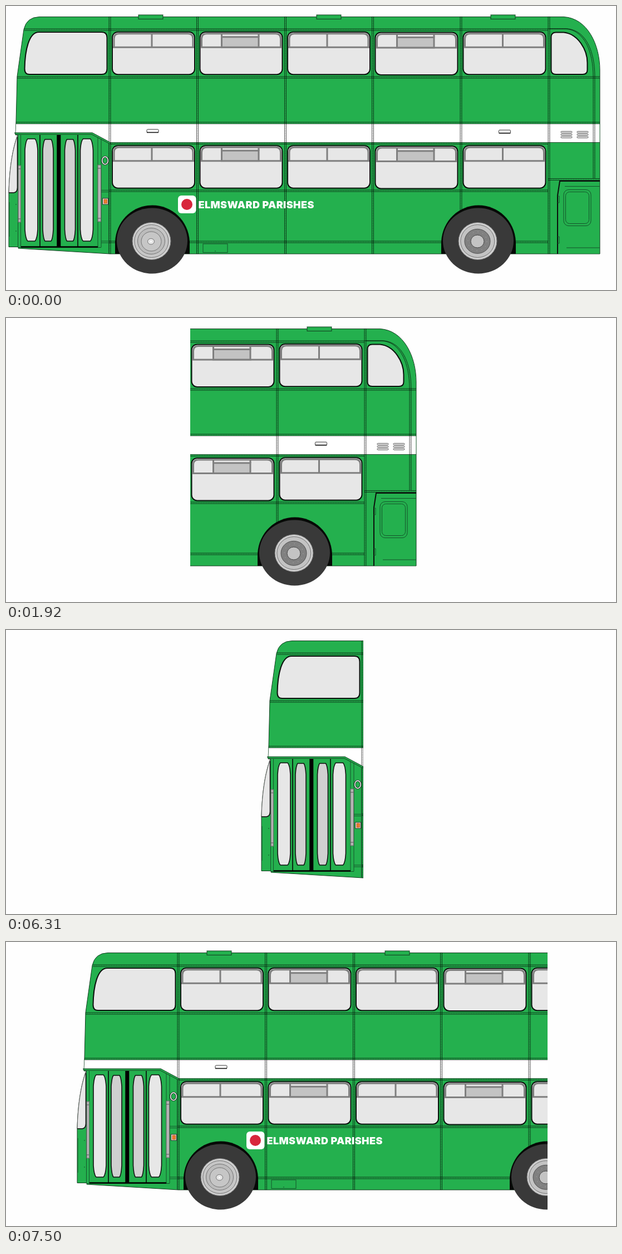
Write an HTML page that moves like this. It is 1096x511 px and loops after 8 s.

```html
<!DOCTYPE html>
<html lang="en">
<head>
<meta charset="utf-8">
<title>Green double-decker</title>
<style>
  html, body { margin: 0; width: 100%; height: 100%; overflow: hidden; background: #fefefe; }
  svg { display: block; width: 1096px; height: 511px; animation: drive 8s step-end infinite; }
  text { font: 900 18px Inter, "Open Sans", sans-serif; letter-spacing: .4px; fill: #fff; }

  .green { fill: #24b04e; }
  .glass { fill: #e7e7e7; }
  .shade { fill: #d0d0d0; }
  .edge { stroke: #123c1f; stroke-width: 1; }
  .rim { stroke: #0b0f0c; stroke-width: 2; }
  .line { fill: none; stroke: #14532a; stroke-width: 1; }
  .seam { fill: none; stroke: #000; stroke-opacity: .62; stroke-width: 1; }
  .stitch { fill: none; stroke: #000; stroke-opacity: .28; stroke-width: 2; stroke-dasharray: 1 2; }
  .bar { fill: none; stroke: #7f7f7f; stroke-width: 3; }
  .rail { fill: #b4b4b4; stroke: #6b6b6b; stroke-width: 1; }
  .ring { stroke: #737373; stroke-width: 1; }

  /* The bus leaves to the left behind one edge and returns from behind the other. */
  @keyframes drive {
    0%      { transform: translateX(0);      clip-path: inset(0 0 0 0); }
    11.875% { transform: translateX(-89px);  clip-path: inset(0 0 0 179px); }
    18.125% { transform: translateX(-185px); clip-path: inset(0 0 0 370px); }
    24%     { transform: translateX(-330px); clip-path: inset(0 0 0 661px); }
    29.375% { transform: translateX(-462px); clip-path: inset(0 0 0 924px); }
    33.875% { transform: translateX(0);      clip-path: inset(0 0 0 1096px); }
    78.875% { transform: translateX(454px);  clip-path: inset(0 908px 0 0); }
    83.25%  { transform: translateX(297px);  clip-path: inset(0 596px 0 0); }
    88.5%   { transform: translateX(217px);  clip-path: inset(0 435px 0 0); }
    93.75%  { transform: translateX(123px);  clip-path: inset(0 246px 0 0); }
  }
</style>
</head>
<body>
<svg viewBox="0 0 1096 511">
  <defs>
    <g id="pane">
      <rect class="glass rim" width="148" height="76.5" rx="10"/>
      <path class="bar" d="M3 26V12Q3 3 12 3H136Q145 3 145 12V26M1 27.5H147"/>
    </g>
    <g id="split">
      <use href="#pane"/>
      <path class="bar" d="M71 3V27"/>
    </g>
    <g id="hopper">
      <use href="#pane"/>
      <rect class="bar" x="39" y="9" width="66.5" height="18.5" style="fill:#c3c3c3"/>
      <path class="bar" d="M39 3V9M105.5 3V9"/>
    </g>
    <g id="deck">
      <use href="#split" x="191"/>
      <use href="#hopper" x="348.5"/>
      <use href="#split" x="506"/>
      <use href="#hopper" x="663.5" y=".7"/>
      <use href="#split" x="821.5"/>
    </g>

    <path id="uprights" d="M185 19V446M342.5 19V446M500.5 19V446M657.5 19V446M816 19V446M974 19V446"/>
    <path id="levels" d="M33 41H974M20 127H1067M18 209H1067M188 245.5H974M171 331H974M171 423H974M974 310.5H1067"/>
    <path id="tail" d="M974 41H1006C1040 44 1055 84 1055 127V310"/>

    <rect id="vent" class="green edge" y="16" width="44" height="7.5"/>
    <g id="handle">
      <rect width="21" height="5.5" rx="1.5" fill="#fff" stroke="#333"/>
      <path d="M0 5.5H21" stroke="#111" stroke-width="1.6"/>
    </g>
    <g id="louvre" fill="#fff" stroke="#444" stroke-width=".9">
      <rect width="20" height="2.6" rx="1.3"/>
      <rect y="4.6" width="20" height="2.6" rx="1.3"/>
      <rect y="9.2" width="20" height="2.6" rx="1.3"/>
    </g>
    <path id="wide" d="M5 239H18Q22 243 23 260V402Q22 419 18 423H5Q1 419 0 402V260Q1 243 5 239Z" stroke="#111" stroke-width="1.6"/>
    <path id="slim" d="M4 240H15Q18 244 19 260V402Q18 419 15 423H4Q1 419 0 402V260Q1 244 4 240Z" stroke="#111" stroke-width="1.6"/>
    <g id="tyre">
      <path d="M-67 446V424C-65 386-35 358.500 0 358.500S65 386 67 424V446Z" fill="#060806"/>
      <ellipse cx="-.5" cy="422.500" rx="63.500" ry="59" fill="#393939"/>
      <ellipse class="ring" cx="-1.500" cy="423" rx="34.500" ry="33.500" fill="#cfcfcf"/>
    </g>
  </defs>

  <!-- Body shell -->
  <path class="green edge" d="M60 19.500H1002C1045 22 1067 70 1067 115V446H187L22 436V433.500H5V336C6 292 12 256 21 232H17L18 209 20 127 32 42Q37 20 60 19.500Z"/>
  <path d="M18 212H1066.500V245.500H187L155 229H17.500Z" fill="#fff"/>

  <!-- Panel seams -->
  <g class="seam">
    <use href="#uprights"/><use href="#uprights" x="3"/>
    <use href="#levels"/><use href="#levels" y="3"/>
    <use href="#tail"/><use href="#tail" x="3"/>
    <path d="M974 245.500H1067"/>
  </g>
  <g class="stitch">
    <use href="#uprights" x="1.500"/>
    <use href="#levels" y="1.500"/>
    <use href="#tail" x="1.500"/>
  </g>

  <use href="#vent" x="238"/>
  <use href="#vent" x="558"/>
  <use href="#vent" x="871"/>

  <!-- Windows -->
  <path class="glass rim" d="M59 47H172Q181.500 47 181.500 57V113Q181.500 123 172 123H42Q33.500 123 33.500 113C34 80 41 47 59 47Z"/>
  <use href="#deck" y="46.700"/>
  <use href="#deck" y="251.200"/>
  <path class="glass rim" d="M988 47.500H1002C1028 50 1044.500 79 1044.500 102V115Q1044.500 123 1036 123H988Q979.500 123 979.500 115V56Q979.500 47.500 988 47.500Z"/>

  <use href="#handle" x="253" y="222"/>
  <use href="#handle" x="885.500" y="223.200"/>
  <use href="#louvre" x="997" y="225.500"/>
  <use href="#louvre" x="1026" y="225.500"/>

  <!-- Cab and entrance -->
  <path class="glass" d="M21 232C12 256 6 292 5 336H14Q20.500 335 20.500 327Z" stroke="#555"/>
  <path d="M5 336H14Q20.500 335 20.500 327V236" fill="none" stroke="#111" stroke-width="1.600"/>
  <path class="green" d="M22 231H155L184 247V434H22Z"/>
  <path class="line" d="M21.500 232V434M26.500 232V434M165 236V434M171 240V434M184.500 247V446M171 331.500H187M171 334.500H187M171 423H187M171 426H187M22 434.500H171"/>
  <path class="line" d="M6 353V415M18 356V358M18 404V406"/>
  <path class="green edge" d="M15.500 228H155L187.500 245.500V248.500L154 231H17Z"/>
  <path d="M61 232V433M129 232V433" stroke="#0b1a10" stroke-width="1.800"/>
  <path d="M94.800 232V433" stroke="#000" stroke-width="7"/>
  <path d="M27 433.500H165" stroke="#000" stroke-width="2.600"/>
  <use href="#wide" class="glass" x="34"/>
  <use href="#slim" class="shade" x="66"/>
  <use href="#slim" class="shade" x="105.500"/>
  <use href="#wide" class="glass" x="133.500"/>
  <rect class="rail" x="22" y="287" width="4.500" height="102"/>
  <rect class="rail" x="165" y="286" width="5.500" height="102"/>
  <path d="M22 293H26M22 383H26M165 292H170M165 382H170" stroke="#555"/>
  <ellipse cx="178" cy="278" rx="5.300" ry="6.800" fill="none" stroke="#111" stroke-width="3.200"/>
  <ellipse cx="178" cy="278" rx="5.300" ry="6.800" fill="none" stroke="#eee" stroke-width="1.700"/>
  <rect x="173.500" y="346" width="10" height="11" fill="#e9ddd5" stroke="#333"/>
  <rect x="176" y="348" width="5.500" height="7" fill="#ee7a2e" stroke="#b3541c" stroke-width=".8"/>

  <!-- Engine cover -->
  <path class="green" d="M995 315H1066V445.500H991V340Z"/>
  <path class="rim" d="M1067 315H995L991 341V446" fill="none"/>
  <path class="line" d="M1004 324.500H1067M1007 435H1067M991 342H994V354H991M991 415H994V427H991"/>
  <rect class="line" x="1002" y="330.500" width="49" height="65" rx="9"/>
  <rect class="line" x="1005.500" y="334.500" width="42" height="57" rx="7"/>

  <rect class="line" x="354" y="428" width="44" height="15.500"/>
  <path class="line" d="M376 440V442"/>

  <!-- Fleet name -->
  <rect x="309" y="341" width="32.500" height="32" rx="6" fill="#fff"/>
  <circle cx="325" cy="357" r="10" fill="#d8263c"/>
  <text x="345.500" y="364">ELMSWARD PARISHES</text>

  <!-- Wheels -->
  <use href="#tyre" x="263"/>
  <g class="ring" fill="#c6c6c6">
    <ellipse cx="261.300" cy="423" rx="30.500" ry="29.500"/>
    <ellipse cx="261" cy="423" rx="24.500" ry="23.500" fill="#bcbcbc"/>
    <ellipse cx="261" cy="423.500" rx="18" ry="17.500"/>
    <ellipse cx="260.500" cy="423.700" rx="6" ry="5.300" fill="#e4e4e4"/>
    <circle cx="260.500" cy="423.700" r="1.500" fill="#fff" stroke="none"/>
  </g>
  <use href="#tyre" x="849"/>
  <g class="ring" fill="#c3c3c3">
    <ellipse cx="847.300" cy="423" rx="30.500" ry="29.500"/>
    <ellipse cx="847" cy="423.300" rx="23" ry="22" fill="#808080" stroke="#505050"/>
    <circle cx="847" cy="423.300" r="17" fill="none" stroke="#a8a8a8" stroke-dasharray="1.500 7.400"/>
    <ellipse cx="847" cy="423.500" rx="12" ry="11.500" stroke="#444"/>
  </g>
</svg>
</body>
</html>
```
